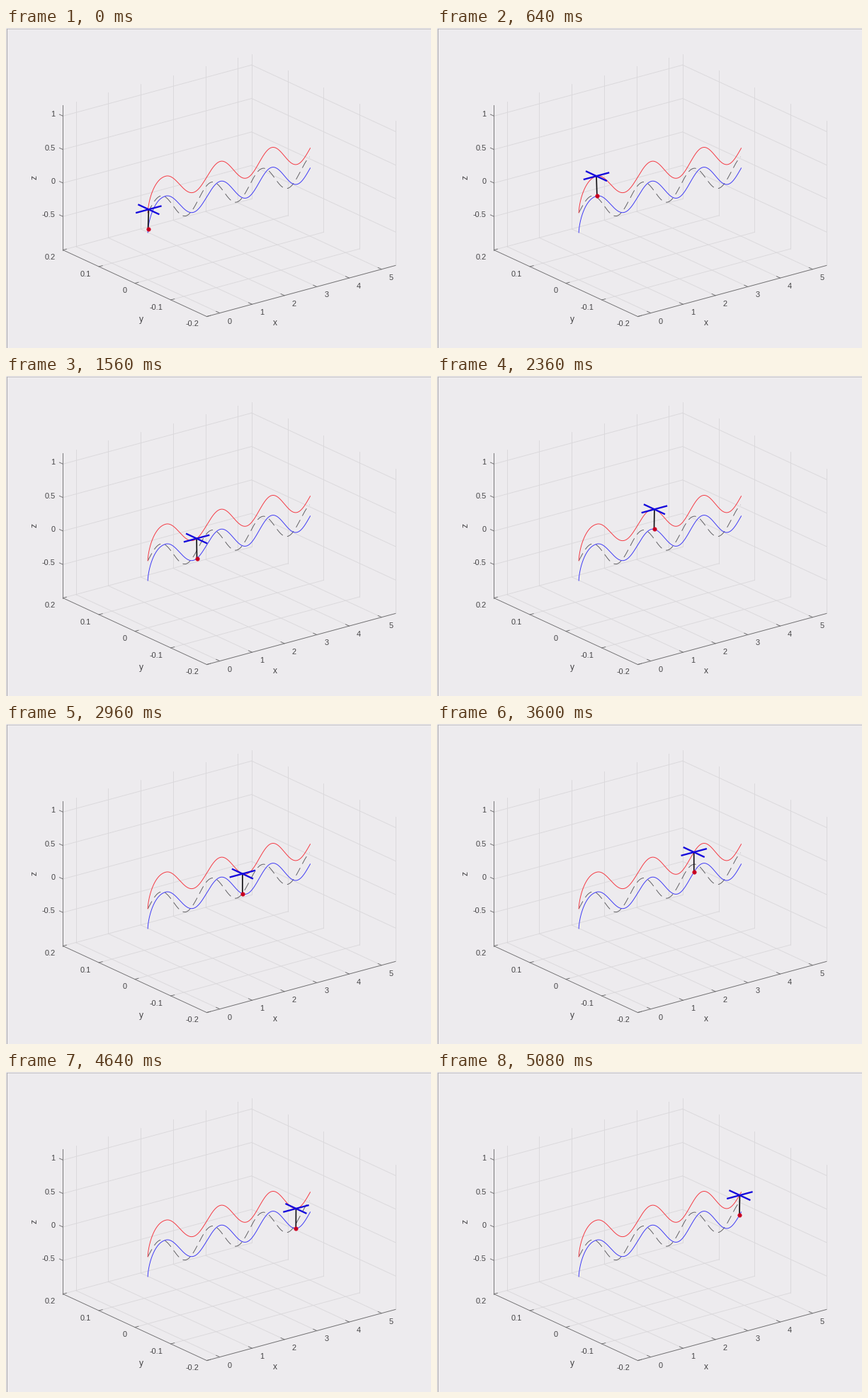
These frames come from a looping animation (600 by 452 pixels, 5.12 s). A matplotlib script:

```python
import numpy as np
import matplotlib.pyplot as plt
from matplotlib.animation import FuncAnimation

W, H, DPI = 600, 452, 64
FRAMES, INTERVAL = 128, 40
PT = 72 / DPI  # points per pixel

BG, GRID, AXIS, INK = "#edebee", "#dad8db", "#6e6d6f", "#454446"

fig = plt.figure(figsize=(W / DPI, H / DPI), dpi=DPI, facecolor=BG)
ax = fig.add_axes([0, 0, 1, 1])
ax.set_xlim(-0.5, W - 0.5)
ax.set_ylim(H - 0.5, -0.5)
ax.axis("off")

# Projected unit steps of the 3D axes, in pixels
ORIGIN = np.array([199.7, 260.5])
EX = np.array([45.7, -12.37])
EY = np.array([-507.5, -235.0])
EZ = np.array([0.0, -94.6])
X0, X1 = -0.4, 5.43
Y0, Y1 = -0.2, 0.2
Z0, Z1 = -1.0, 1.166


def project(x, y, z):
    return ORIGIN + x * EX + y * EY + z * EZ


def line(p, q, color, width, **kw):
    return ax.plot([p[0], q[0]], [p[1], q[1]], color=color, lw=width * PT, **kw)[0]


def label(x, y, s, size=11, **kw):
    ax.text(x, y, s, fontsize=size * PT, color=INK, family="Liberation Sans", **kw)


def edge(a, b, color=GRID, width=0.9):
    line(project(*a), project(*b), color, width, zorder=1 if color == GRID else 2)


def draw_box():
    xs, ys, zs = range(6), (-0.2, -0.1, 0, 0.1, 0.2), (-0.5, 0, 0.5, 1)
    for x in xs:
        edge((x, Y0, Z0), (x, Y1, Z0))
        edge((x, Y1, Z0), (x, Y1, Z1))
    for y in ys:
        edge((X0, y, Z0), (X1, y, Z0))
        edge((X1, y, Z0), (X1, y, Z1))
    for z in zs:
        edge((X0, Y1, z), (X1, Y1, z))
        edge((X1, Y0, z), (X1, Y1, z))

    edge((X0, Y1, Z0), (X0, Y1, Z1), AXIS)
    edge((X0, Y0, Z0), (X0, Y1, Z0), AXIS)
    edge((X0, Y0, Z0), (X1, Y0, Z0), AXIS)

    along_x = 5.2 * EX / np.hypot(*EX)
    along_y = 5.5 * EY / np.hypot(*EY)
    for x in xs:
        p = project(x, Y0, Z0)
        line(p, p + along_y, AXIS, 0.9)
        label(p[0] + 10.5, p[1] + 15, str(x))
    for y in ys:
        p = project(X0, y, Z0)
        line(p, p + along_x, AXIS, 0.9)
        label(p[0] - 11, p[1] + 13.5, f"{y:g}", ha="right")
    for z in zs:
        p = project(X0, Y1, z)
        line(p, p + along_y, AXIS, 0.9)
        label(p[0] - 11, p[1] + 1, f"{z:g}", ha="right")

    label(379, 420, "x", 12, ha="center")
    label(190, 415, "y", 12, ha="center")
    label(40, 211, "z", 12, ha="center", va="center", rotation=90)
    line((0, 0), (W, 0), "#c3c1c4", 1)
    line((0, 0), (0, H), "#a9a7aa", 1)


CABLE = 28.1
START, SWING = -28.0, 16.8
TURNS = np.array([225, 264, 302, 339, 374.5, 410.5, 446])


def load_y(px):
    """Height of the load path: a steep rise, then a lagging sine."""
    px = np.asarray(px, float)
    s = np.clip((px - ORIGIN[0]) / (TURNS[0] - ORIGIN[0]), 0, 1)
    rise = START + (SWING - START) * (1 - (1 - s) ** 2.2) ** 0.625
    wave = SWING * np.cos(np.pi * np.interp(px, TURNS, np.arange(len(TURNS))))
    lift = np.where(px < TURNS[0], rise, wave)
    return ORIGIN[1] + (px - ORIGIN[0]) * EX[1] / EX[0] - lift


def smooth(t, ts, vs):
    """Cubic Hermite curve through a few knots."""
    ts, vs = np.array(ts, float), np.array(vs, float)
    m = np.gradient(vs, ts)
    k = int(np.clip(np.searchsorted(ts, t, side="right") - 1, 0, len(ts) - 2))
    h = ts[k + 1] - ts[k]
    u = (t - ts[k]) / h
    return ((1 + 2 * u) * (1 - u) ** 2 * vs[k] + u * (1 - u) ** 2 * h * m[k]
            + u * u * (3 - 2 * u) * vs[k + 1] + u * u * (u - 1) * h * m[k + 1])


KEYS = [0, 4, 8, 12, 16, 39, 59, 74, 106, 126]
LOAD_X = [200, 203.2, 209.1, 216.9, 225.4, 269, 306, 333.3, 391, 426.5]
TILT = [0.9, 0.6, 0, -0.6, -0.9, -0.4, 0.4, 0.1, 0, 0.4]

draw_box()

t = np.linspace(0, 5, 400)
ref = ORIGIN[:, None] + np.outer(EX, t) + np.outer(EZ, 0.2 * np.sin(4 * t))
ax.plot(*ref, color="#58575a", lw=0.9 * PT, dashes=(12 / 0.9, 6.5 / 0.9),
        dash_capstyle="butt", zorder=3)
path = np.r_[ORIGIN[0] + 25 * np.linspace(0, 1, 80) ** 2, np.linspace(225, 429, 400)]
ax.plot(path, load_y(path) - CABLE, color="#f5363f", lw=0.95 * PT, zorder=3)
ax.plot(path, load_y(path), color="#3a36f5", lw=0.95 * PT, zorder=3)

ARMS = np.array([[15, 7], [18.2, -4.9]])
BLUE = "#1408dc"
cable = line((0, 0), (0, 0), "#141216", 1.7, zorder=5)
arms = [line((0, 0), (0, 0), BLUE, 2.3, zorder=6, solid_capstyle="butt") for _ in ARMS]
load, = ax.plot([], [], "o", ms=5.4 * PT, mfc="#c4001f", mec="#dc0a28",
                mew=0.7 * PT, zorder=7)


def update(i):
    n = min(i, KEYS[-1])
    x = smooth(n, KEYS, LOAD_X)
    y = float(load_y(x))
    cx, cy = x + smooth(n, KEYS, TILT), y - CABLE
    cable.set_data([cx, x], [cy, y])
    load.set_data([x], [y])
    for arm, (dx, dy) in zip(arms, ARMS):
        arm.set_data([cx - dx, cx + dx], [cy - dy, cy + dy])
    return [cable, load, *arms]


anim = FuncAnimation(fig, update, frames=FRAMES, interval=INTERVAL,
                     repeat=True, repeat_delay=0, blit=False)
plt.show()
```
